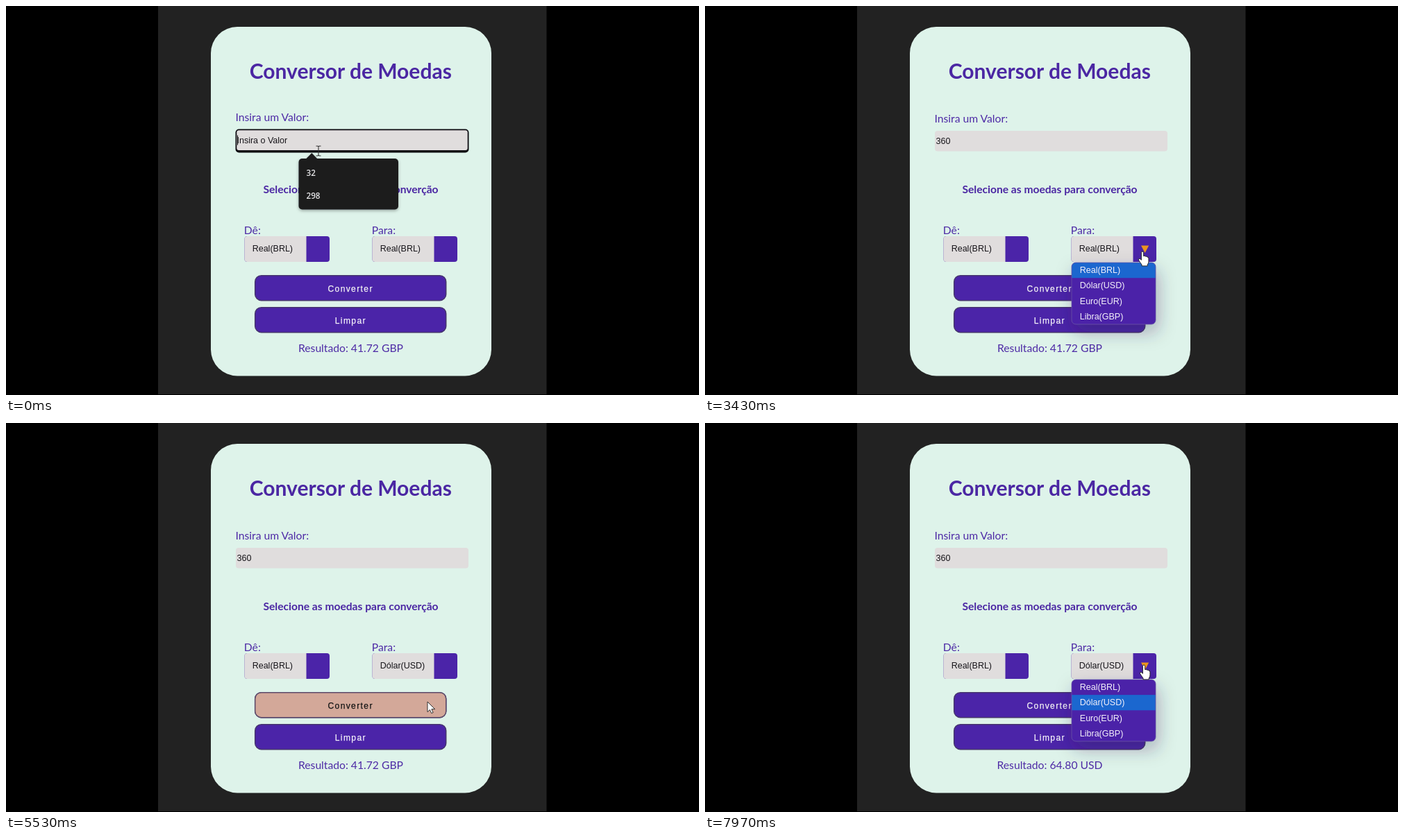
Animation of 998 by 561 pixels, one loop 8000 ms. Source, as an HTML page:

```html
<!DOCTYPE html>
<html lang="pt-BR">
<head>
<meta charset="utf-8">
<title>Conversor de Moedas</title>
<style>
  html, body { margin: 0; width: 100%; height: 100%; overflow: hidden; background: #000; }
  svg { display: block; width: 100%; height: 100%; }
  .label { font: 15.7px Lato, sans-serif; fill: #4e2ba6; }
  .title { font: bold 30px Lato, sans-serif; fill: #4b27a3; }
  .subtitle { font: bold 15.6px Lato, sans-serif; fill: #4b27a3; }
  .field { font: 12.5px "Liberation Sans", Arial, sans-serif; fill: #17151a; }
  .option { fill: #f4f1fa; }
  .button { font: 12px "Liberation Sans", Arial, sans-serif; letter-spacing: 1.4px;
            fill: currentColor; stroke: currentColor; stroke-width: .25px; color: #f4f1fa; }
  .suggestion { font: 600 11.7px "Open Sans", sans-serif; fill: #e6e6e6; }
  .middle { text-anchor: middle; }
  .purple { fill: #4b24a8; }
  .pale { fill: #e0dddd; }
</style>
</head>
<body>
<svg viewBox="0 0 998 561">
  <defs>
    <filter id="shadow" x="-50%" y="-50%" width="200%" height="200%">
      <feDropShadow dx="3" dy="11" stdDeviation="13" flood-color="#2a2450" flood-opacity=".32"/>
    </filter>
    <filter id="soft" x="-20%" y="-20%" width="140%" height="150%">
      <feDropShadow dx="0" dy="2" stdDeviation="2" flood-opacity=".3"/>
    </filter>
    <clipPath id="listClip"><rect x="528" y="370" width="121" height="89" rx="6"/></clipPath>
  </defs>

  <rect x="219" width="559.5" height="560" fill="#222"/>
  <rect x="295" y="30" width="404" height="503.5" rx="38" fill="#def3ea"/>
  <text class="title middle" x="496.3" y="104.5">Conversor de Moedas</text>

  <text class="label" id="inputLabel" x="330.5">Insira um Valor:</text>
  <g id="focusBox">
    <rect x="330.5" y="177.5" width="336" height="34" rx="5" fill="#0c0a10"/>
    <rect x="332.3" y="179.3" width="332.4" height="28.7" rx="3" class="pale"/>
  </g>
  <rect id="plainBox" x="331" y="180" width="335" height="29.5" rx="4" class="pale"/>
  <text class="field" id="value" x="332.5"></text>
  <rect id="caret" y="186.5" width="1" height="14" fill="#111"/>

  <text class="subtitle middle" x="496.5" y="270">Selecione as moedas para converção</text>

  <text class="label" x="342.8" y="328.5">Dê:</text>
  <text class="label" x="526.8" y="328.5">Para:</text>
  <g id="selects"></g>
  <text class="field" x="354.7" y="354">Real(BRL)</text>
  <text class="field" id="target" x="538.7" y="354"></text>
  <path id="arrow" d="M628 345.5H639.2L633.6 356Z" fill="#ec951f"/>

  <g stroke="#46356e" stroke-width="1.5">
    <rect x="358.7" y="388.7" width="275" height="36" rx="9" class="purple"/>
    <rect x="358.7" y="434.7" width="275" height="36" rx="9" class="purple"/>
    <rect id="fill" x="358.7" y="388.7" height="36" rx="9" fill="#d3a899" stroke="#5c4a69"/>
  </g>
  <text class="button" id="convert" x="463.5" y="412.3">Converter</text>
  <text class="button" x="473.8" y="458.3">Limpar</text>
  <text class="label middle" id="result" x="496.5" y="499"></text>

  <g id="suggestions" filter="url(#soft)">
    <path d="M431.5 221L440.3 212L449 221Z" fill="#1b1b1e"/>
    <rect x="421.5" y="220" width="143.5" height="73.5" rx="5" fill="#1b1b1e"/>
    <text class="suggestion" x="432.5" y="244.7">32</text>
    <text class="suggestion" x="432.5" y="277.7">298</text>
  </g>

  <g id="list">
    <rect x="528" y="370" width="121" height="89" rx="6" class="purple" filter="url(#shadow)"/>
    <rect id="highlight" x="528" width="121" height="22.2" fill="#1b67cf" clip-path="url(#listClip)"/>
    <rect x="528" y="370" width="121" height="89" rx="6" fill="none" stroke="#6a55a8" stroke-width=".8"/>
    <g id="options"></g>
  </g>

  <g id="cursor">
    <path id="ibeam" d="M-3.5 -7H-1L0 -6L1 -7H3.5M0 -6V6M-3.5 7H-1L0 6L1 7H3.5"
          fill="none" stroke="#333" stroke-width="1.1"/>
    <path id="pointer" d="M0 0V16L3.7 12.5L6.2 18L8.8 16.9L6.4 11.6H11.6Z"
          transform="scale(.92)" fill="#fff" stroke="#222"/>
    <path id="hand" d="M-1.7 1.6Q-1.7 0 0 0T1.7 1.6V7Q3.6 6 4.7 7.6Q6.6 6.8 7.4 8.6Q9.4 8.4 9.4 10.5V15Q9.4 18 7.6 20V22H-1V20Q-3.5 17 -5.8 13Q-6.2 10.5 -4 11L-1.7 13Z"
          transform="scale(.95)" fill="#fff" stroke="#222"/>
  </g>
</svg>

<script>
const LOOP = 8000;
const $ = id => document.getElementById(id);
const currencies = ["Real(BRL)", "Dólar(USD)", "Euro(EUR)", "Libra(GBP)"];

// time, x, y
const mouse = [
  [0, 450, 209], [1700, 450, 209], [2330, 555, 327], [2900, 630, 354],
  [3750, 630, 354], [4350, 625, 402], [4800, 625, 402], [5250, 607, 402],
  [6730, 607, 402], [6930, 632, 353], [7500, 632, 353], [7900, 632, 349], [LOOP, 632, 349]
];
const keys = [800, 1070, 1330];
const blurAt = 3270, pickAt = 4700, reopenAt = 7430, resultAt = 6200;

$("selects").innerHTML = [343.5, 527.5].map(x => `
  <rect x="${x}" y="332" width="122.5" height="37" rx="4" class="purple"/>
  <path d="M${x + 89} 332H${x + 4}q-4 0 -4 4v29q0 4 4 4h85z" class="pale"/>`).join("");
$("options").innerHTML = currencies.map((name, i) =>
  `<text class="field option" x="539.8" y="${385.3 + 22.1 * i}">${name}</text>`).join("");

const show = (id, on) => $(id).style.display = on ? "" : "none";
const setText = (id, text) => { if ($(id).textContent !== text) $(id).textContent = text; };
const smooth = u => u * u * (3 - 2 * u);
const ramp = (t, start, length) => smooth(Math.min(1, Math.max(0, (t - start) / length)));

function mouseAt(t) {
  const i = mouse.findIndex(step => step[0] > t);
  const [t0, x0, y0] = mouse[i - 1], [t1, x1, y1] = mouse[i];
  const u = smooth((t - t0) / (t1 - t0));
  return [x0 + (x1 - x0) * u, y0 + (y1 - y0) * u];
}

function drawInput(t) {
  const focused = t < blurAt;
  const typed = keys.filter(k => k <= t).length;
  const lastKey = typed ? keys[typed - 1] : 0;
  show("focusBox", focused);
  show("plainBox", !focused);
  show("suggestions", !typed);
  show("caret", focused && (t - lastKey) % 1000 < 500);
  $("caret").setAttribute("x", 333 + 6.95 * typed);
  $("inputLabel").setAttribute("y", focused ? 166 : 168);
  $("value").setAttribute("y", focused ? 198 : 199);
  setText("value", typed ? "360".slice(0, typed) : "Insira o Valor");
}

function drawSelect(t, y) {
  const first = t >= blurAt && t < pickAt;
  const picked = t >= pickAt;
  const row = picked || y > 392 ? 1 : 0;
  show("list", first || t >= reopenAt);
  $("highlight").setAttribute("y", 370 + 22.1 * row);
  setText("target", currencies[picked ? 1 : 0]);
  $("arrow").style.opacity = ramp(t, 2600, 200) - ramp(t, 4760, 200) + ramp(t, 6880, 200);
}

function drawButton(t) {
  const p = ramp(t, 4740, 480) - ramp(t, 6770, 480);
  const shade = Math.round(244 - 224 * p);
  show("fill", p > 0.005);
  $("fill").setAttribute("width", 275 * p);
  $("convert").style.color = `rgb(${shade},${shade},${shade})`;
  setText("result", t < resultAt ? "Resultado: 41.72 GBP" : "Resultado: 64.80 USD");
}

function drawCursor(x, y) {
  const onInput = y < 211;
  const onSelect = y > 332 && y < 369 && x > 527 && x < 650;
  show("ibeam", onInput);
  show("hand", onSelect);
  show("pointer", !onInput && !onSelect);
  $("cursor").setAttribute("transform", `translate(${x} ${y})`);
}

const start = performance.now();
function frame() {
  const t = (performance.now() - start) % LOOP;
  const [x, y] = mouseAt(t);
  drawInput(t);
  drawSelect(t, y);
  drawButton(t);
  drawCursor(x, y);
  requestAnimationFrame(frame);
}
frame();
</script>
</body>
</html>
```
